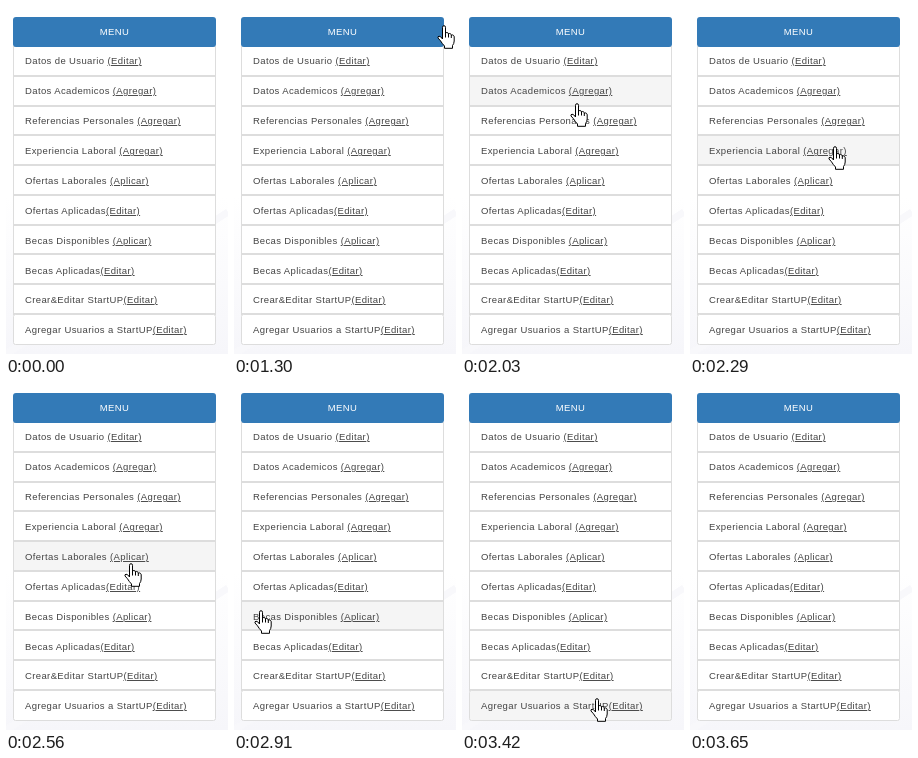
An HTML page for the animation above (5140 ms loop, 222 px wide and 348 px high).

```html
<!DOCTYPE html>
<html lang="es">
<head>
<meta charset="utf-8">
<style>
html, body { margin: 0; width: 100%; height: 100%; overflow: hidden; background: #fff; }
svg { display: block; }
text { font: 9.5px "Liberation Sans", Arial, sans-serif; letter-spacing: .38px; fill: #444; white-space: pre; }
.link { text-decoration: underline; }
</style>
</head>
<body>
<svg id="stage" width="222" height="348" viewBox="0 0 222 348">
  <defs>
    <linearGradient id="haze" x2="0" y2="1">
      <stop offset=".55" stop-color="#fff"/>
      <stop offset="1" stop-color="#f6f6fa"/>
    </linearGradient>
  </defs>
  <rect width="222" height="348" fill="url(#haze)"/>
  <path d="M0 348L222 206" stroke="#f8f8fb" stroke-width="7"/>
  <g id="menu"></g>
  <rect x="7" y="11" width="203" height="30" rx="3" fill="#337ab7"/>
  <text x="108.5" y="29" text-anchor="middle" style="fill:#fff">MENU</text>
  <g id="hand" stroke="#000" stroke-linejoin="round">
    <path fill="#fff" d="M5.5 14V2.3Q5.5 .7 7 .7T8.5 2.3V8.5Q9 7.3 10.2 7.5T11.5 9Q12.3 8.2 13.3 8.7T14.3 10.2Q15.5 9.5 16.4 10.3T17.2 12V16Q17 19 15.5 20.5V23.3H7.5V21Q5 18.5 3.5 15.8L1 13Q.5 11.5 2 11.2T5.5 14Z"/>
    <path fill="none" d="M8.5 8V12.5M11.5 9V12.5M14.3 10V13"/>
  </g>
</svg>
<script>
const LOOP = 5140, TOP = 41, PITCH = 29.75;
const items = [
  ["Datos de Usuario ", "Editar"],
  ["Datos Academicos ", "Agregar"],
  ["Referencias Personales ", "Agregar"],
  ["Experiencia Laboral ", "Agregar"],
  ["Ofertas Laborales ", "Aplicar"],
  ["Ofertas Aplicadas", "Editar"],
  ["Becas Disponibles ", "Aplicar"],
  ["Becas Aplicadas", "Editar"],
  ["Crear&Editar StartUP", "Editar"],
  ["Agregar Usuarios a StartUP", "Editar"]
];
// Pointer path: time, left, top
const path = [
  [1300, 203, 19], [1610, 118, 55], [1810, 24, 61], [1840, 23, 61],
  [2030, 108, 97], [2190, 155, 125], [2360, 127, 150], [2560, 118, 181],
  [2910, 20, 228], [2930, 20, 228], [3220, 116, 290], [3330, 161, 305],
  [3450, 118, 319], [3470, 118, 320], [3650, 118, 348]
];
const menu = document.getElementById("menu");
const hand = document.getElementById("hand");

function add(parent, tag, attrs, content = "") {
  const el = document.createElementNS("http://www.w3.org/2000/svg", tag);
  for (const key in attrs) el.setAttribute(key, attrs[key]);
  el.textContent = content;
  return parent.appendChild(el);
}

const rows = items.map(([label, action], i) => {
  const y = Math.round(TOP + i * PITCH);
  const bottom = Math.round(TOP + (i + 1) * PITCH);
  const last = i === items.length - 1;
  const box = add(menu, "rect", {
    x: 7.5, y: y - .5, width: 202, height: bottom - y,
    rx: last ? 2 : 0, fill: "#fff", stroke: "#ddd"
  });
  if (!last) add(menu, "rect", { x: 7, y: bottom - 2, width: 203, height: 2, fill: "#ddd" });
  const text = add(menu, "text", { x: 19, y: Math.round(58.2 + i * 29.9) }, label);
  add(text, "tspan", { class: "link" }, `(${action})`);
  return { box, y, bottom };
});

function pointerAt(t) {
  const i = path.findIndex(p => p[0] > t);
  if (i < 1) return null;
  const [t0, x0, y0] = path[i - 1], [t1, x1, y1] = path[i];
  const k = (t - t0) / (t1 - t0);
  return { x: x0 + (x1 - x0) * k, y: y0 + (y1 - y0) * k };
}

function draw(now) {
  const p = pointerAt(now % LOOP);
  hand.style.display = p ? "" : "none";
  if (p) hand.setAttribute("transform", `translate(${Math.round(p.x)} ${Math.round(p.y)})`);
  for (const { box, y, bottom } of rows) {
    const over = p && p.y >= y && p.y < bottom;
    box.setAttribute("fill", over ? "#f5f5f5" : "#fff");
  }
}

const start = performance.now();
function tick() {
  draw(performance.now() - start);
  requestAnimationFrame(tick);
}
tick();
</script>
</body>
</html>
```
